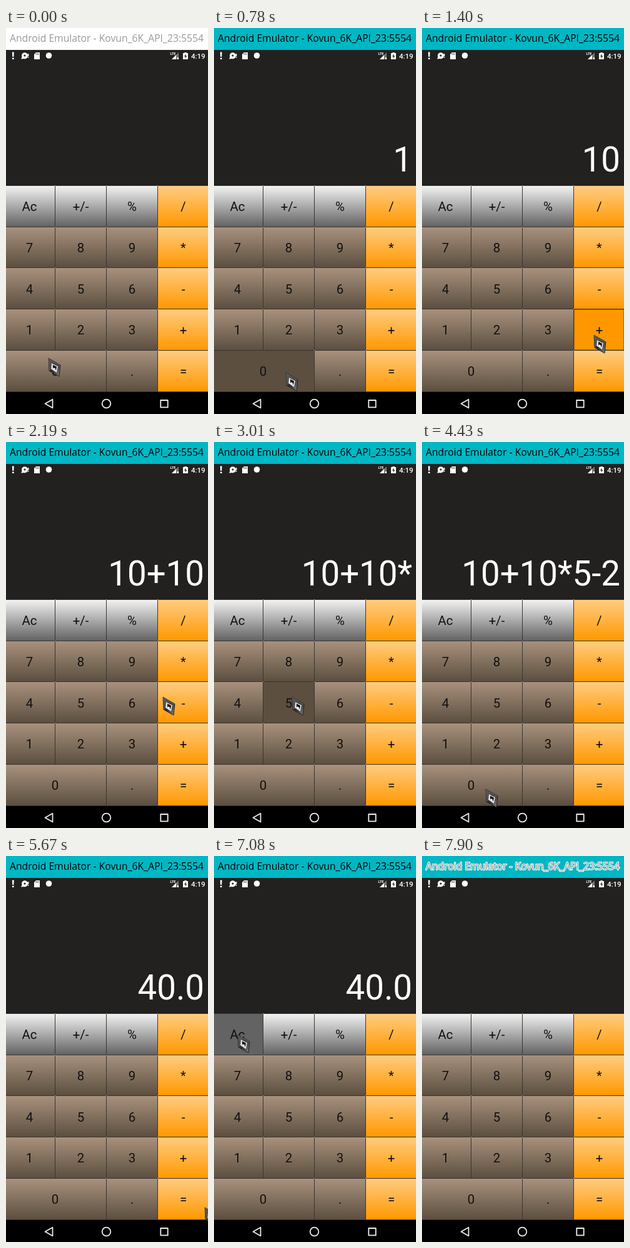
These frames come from a looping animation (323 by 616 pixels, 8.1 s). An HTML page:

```html
<!DOCTYPE html>
<html lang="en">
<head>
<meta charset="utf-8">
<title>Calculator</title>
<style>
  html, body { margin: 0; width: 100%; height: 100%; overflow: hidden; background: #222120; }
  svg { display: block; width: 323px; height: 616px; }
  text { font-family: Roboto, sans-serif; }
  #title { font: 15.7px "Open Sans", sans-serif; stroke-width: 2; paint-order: stroke; stroke-linejoin: round; }
  #display { font-size: 54.6px; fill: #fff; text-anchor: end; }
  #pad text { font-size: 20.4px; fill: #111; text-anchor: middle; }
</style>
</head>
<body>
<svg viewBox="0 0 323 616">
  <defs>
    <linearGradient id="grey" x2="0" y2="1"><stop stop-color="#f2f2f2"/><stop offset="1" stop-color="#636363"/></linearGradient>
    <linearGradient id="brown" x2="0" y2="1"><stop stop-color="#a8917d"/><stop offset="1" stop-color="#5c4f40"/></linearGradient>
    <linearGradient id="orange" x2="0" y2="1"><stop stop-color="#ffcc80"/><stop offset="1" stop-color="#ff9800"/></linearGradient>
    <linearGradient id="metal" x2="1" y2="1"><stop stop-color="#777"/><stop offset=".5" stop-color="#2b2b2b"/><stop offset="1" stop-color="#888"/></linearGradient>
  </defs>

  <rect width="323" height="616" fill="#222120"/>
  <rect id="bar" width="323" height="35"/>
  <text id="title" x="6" y="22">Android Emulator - Kovun_6K_API_23:5554</text>

  <!-- status bar -->
  <g fill="#fff">
    <path d="M9.8 38.5h3l-.5 7.5h-2zM10 47.5h2.6v2.5H10z"/>
    <path d="M24 49.5l1.5-3a5 5 0 1 1 3 2.5zM34.8 41h1.6v4h-1.6zM34.8 46h1.6v1.6h-1.6z"/>
    <circle cx="30" cy="44" r="1.5" fill="#222120"/>
    <path d="M45 42l3-3h6v11h-9z"/>
    <path d="M48 40.5v2M50 40.5v2M52 40.5v2" stroke="#222120"/>
    <circle cx="68.5" cy="44" r="4.8"/>
    <text x="262.5" y="43" font-size="5.5" font-weight="700">LTE</text>
    <path d="M265 50l11-11v11z" fill="#777"/>
    <path d="M265 50l7-7v7z"/>
    <path d="M274 47h2v3h-2z"/>
    <path d="M283 40h2.3v-1h3.4v1h2.3v10h-8z"/>
    <path d="M288 41l-3.2 4.5h2.2l-.8 3.5 3.2-4.5h-2.2z" fill="#222120"/>
    <text x="296" y="48.5" font-size="11.5" font-weight="500">4:19</text>
  </g>

  <text id="display" x="317" y="229"></text>
  <rect y="251" width="323" height="330" fill="#38342f"/>
  <g id="pad"></g>

  <!-- navigation bar -->
  <rect y="581" width="323" height="35" fill="#000"/>
  <g fill="none" stroke="#eee" stroke-width="1.8" stroke-linejoin="round">
    <path d="M62.5 599.5l12-6.8v13.6z"/>
    <circle cx="160.5" cy="599.5" r="6.8"/>
    <path d="M247.3 594h11.4v11.4h-11.4z"/>
  </g>

  <g id="cursor">
    <path d="M0 0L19 11 17 29 1 20z" fill="url(#metal)" stroke="#111" stroke-width=".8"/>
    <path d="M0 0L19 11 16 12 3 5 3 18 1 20z" fill="#555"/>
    <path d="M5 8L15 13 13 23 4 17z" fill="#ddd"/>
    <path d="M7 10.5L13 13.5 12 19 7 16z" fill="#151515"/>
    <path d="M8 15l3 1.5-.5 3-3-2z" fill="#fff"/>
  </g>
</svg>
<script>
const LOOP = 8100;
const $ = id => document.getElementById(id);

function add(parent, tag, attributes, content = "") {
  const node = document.createElementNS("http://www.w3.org/2000/svg", tag);
  for (const name in attributes) node.setAttribute(name, attributes[name]);
  node.textContent = content;
  return parent.appendChild(node);
}

// keypad
const columns = [0, 79, 161, 243, 324];
const rows = [252, 318, 383, 449, 515, 581];
const flat = { grey: "#636363", brown: "#5c4f40", orange: "#ff9800" };
const keys = {};

function addKey(label, column, row, span = 1) {
  const color = column === 3 ? "orange" : row ? "brown" : "grey";
  const rect = add($("pad"), "rect", {
    x: columns[column], y: rows[row],
    width: columns[column + span] - columns[column] - 1,
    height: rows[row + 1] - rows[row] - 1
  });
  add($("pad"), "text", {
    x: 37.5 + 82 * column + 41 * (span - 1),
    y: 292 + 65.8 * row
  }, label);
  keys[label] = { rect, color };
}

["Ac +/- % /", "7 8 9 *", "4 5 6 -", "1 2 3 +"].forEach((line, row) =>
  line.split(" ").forEach((label, column) => addKey(label, column, row)));
addKey("0", 0, 4, 2);
addKey(".", 2, 4);
addKey("=", 3, 4);

// pale specks where the key corners meet
for (const y of rows.slice(0, 5))
  for (const x of columns.slice(1, 4))
    if (x !== 79 || y !== 515) add($("pad"), "rect", { x: x - 1, y: y - 1, width: 1, height: 1, fill: "#bbb" });

// start time, cursor x and y, display, pressed key
const steps = [
  [0, 68, 527, ""],
  [200, 45, 490, ""],
  [390, 40, 478, "", "1"],
  [580, 70, 515, "1"],
  [780, 115, 550, "1", "0"],
  [980, 165, 530, "10"],
  [1180, 262, 488, "10"],
  [1400, 275, 490, "10", "+"],
  [1600, 170, 485, "10+"],
  [1800, 42, 480, "10+", "1"],
  [2000, 70, 540, "10+1", "0"],
  [2190, 251, 407, "10+10"],
  [2410, 284, 350, "10+10"],
  [2610, 285, 348, "10+10", "*"],
  [2810, 215, 375, "10+10*"],
  [3010, 125, 407, "10+10*", "5"],
  [3210, 175, 412, "10+10*5"],
  [3410, 265, 420, "10+10*5"],
  [3630, 296, 422, "10+10*5", "-"],
  [3830, 255, 435, "10+10*5-"],
  [4030, 160, 465, "10+10*5-"],
  [4230, 122, 480, "10+10*5-", "2"],
  [4430, 102, 554, "10+10*5-2"],
  [4650, 102, 554, "10+10*5-2", "0"],
  [4850, 315, 561, "10+10*5-20"],
  [5050, 318, 561, "10+10*5-20"],
  [5470, 318, 561, "10+10*5-20", "="],
  [5670, 318, 561, "40.0"],
  [6680, 230, 470, "40.0"],
  [6880, 80, 320, "40.0"],
  [7080, 38, 285, "40.0", "Ac"],
  [7280, 38, 290, ""],
  [7480, 60, 592, ""],
  [7680, 60, 620, ""]
];

function setTitle(background, fill, stroke) {
  $("bar").setAttribute("fill", background);
  $("title").setAttribute("fill", fill);
  $("title").setAttribute("stroke", stroke);
}

function draw(time) {
  const [, x, y, value, pressed] = steps.findLast(step => step[0] <= time);
  $("cursor").setAttribute("transform", `translate(${x} ${y})`);
  $("display").textContent = value;

  for (const label in keys) {
    const { rect, color } = keys[label];
    const down = label === pressed;
    rect.setAttribute("fill", down ? flat[color] : `url(#${color})`);
    rect.setAttribute("stroke", down && color === "orange" ? "#4a3a20" : "none");
  }

  if (time < 200) setTitle("#fff", "#999", "none");
  else if (time < 7900) setTitle("#00b7c3", "#000", "none");
  else setTitle("#00b7c3", "#999", "#fff");
}

const start = performance.now();
function tick() {
  draw((performance.now() - start) % LOOP);
  requestAnimationFrame(tick);
}
tick();
</script>
</body>
</html>
```
